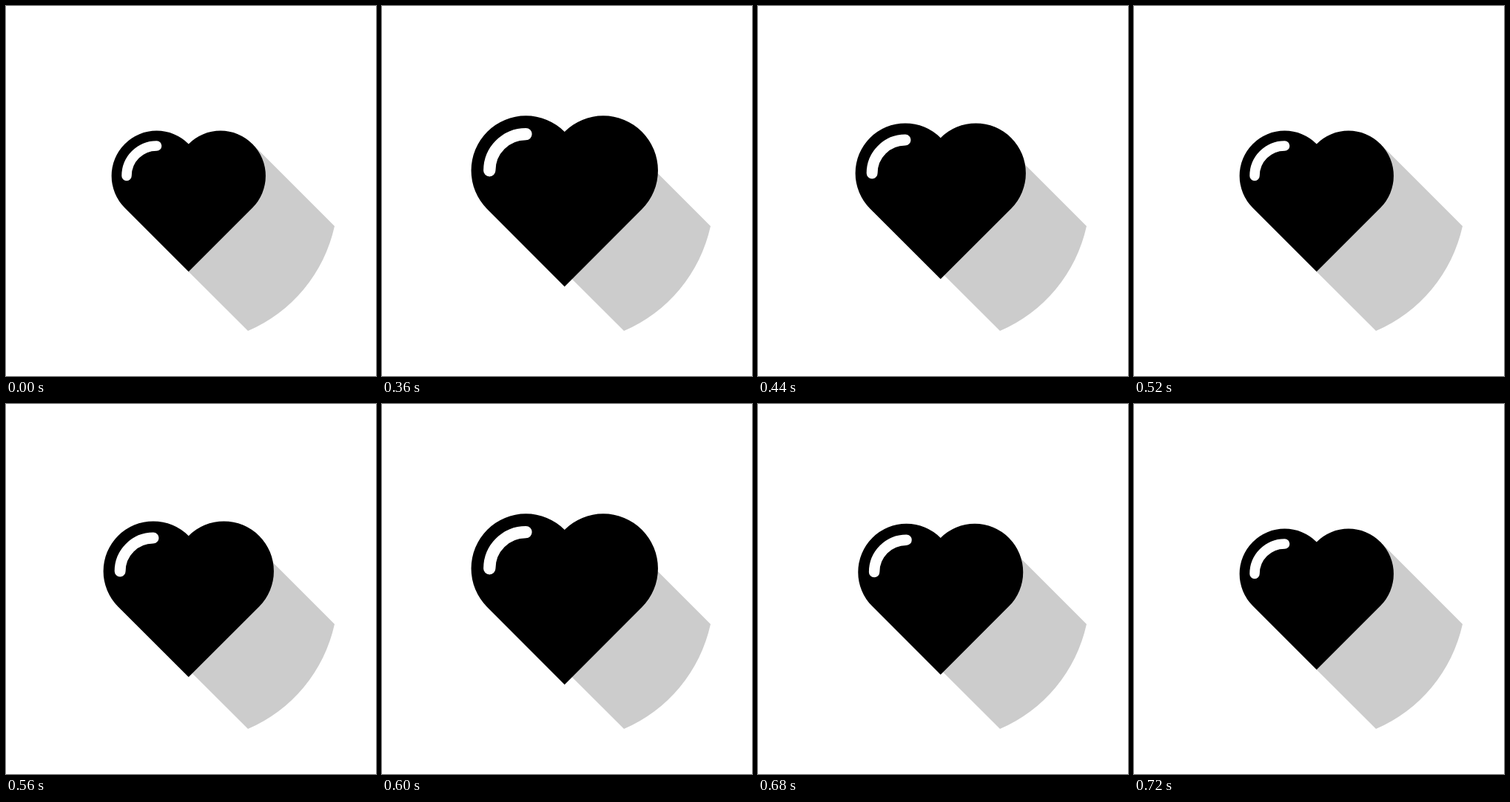
Write an HTML page with a canvas that moves like this. It is 500 px wide and 500 px high and loops after 2.4 s.

```html
<!DOCTYPE html>
<html lang="en">
<head>
<meta charset="utf-8">
<title>Heartbeat</title>
<style>
  html, body { margin: 0; width: 100%; height: 100%; overflow: hidden; background: #fff; }
  canvas { display: block; width: 500px; height: 500px; }
</style>
</head>
<body>
<canvas id="stage" width="500" height="500"></canvas>
<script>
const ctx = document.getElementById('stage').getContext('2d');
const LOOP = 2400, STEP = 40;
const CX = 246.75, CY = 263.75;   // beat centre
const R = 61, D = R / Math.SQRT2; // lobe radius and lobe offset
const LOBE_Y = -34.2;             // lobe centres, relative to the beat centre
const PEAK = 0.212;

// [time, growth]: two beats, the first starting abruptly
const BEATS = [[360, PEAK], [520, 0], [600, PEAK], [720, 0]];

function scaleAt(time) {
  const t = Math.floor(time / STEP) * STEP;
  for (let i = 1; i < BEATS.length; i++) {
    const [t0, a] = BEATS[i - 1], [t1, b] = BEATS[i];
    if (t >= t0 && t < t1) return 1 + a + (b - a) * (t - t0) / (t1 - t0);
  }
  return 1;
}

function drawShadow() {
  const x = 247.5, y = 254.2, r = 201.2;
  ctx.beginPath();
  ctx.moveTo(CX + 2 * D, CY + LOBE_Y - D);
  ctx.lineTo(444, 297.5);
  ctx.arc(x, y, r, Math.atan2(297.5 - y, 444 - x), Math.atan2(439 - y, 327 - x));
  ctx.lineTo(CX, CY + LOBE_Y + 3 * D);
  ctx.closePath();
  ctx.fillStyle = '#ccc';
  ctx.fill();
}

function drawHeart(scale) {
  ctx.save();
  ctx.translate(CX, CY);
  ctx.scale(scale, scale);

  ctx.beginPath();
  ctx.moveTo(0, LOBE_Y + 3 * D);
  ctx.arc(-D, LOBE_Y, R, Math.PI * 0.75, Math.PI * 1.75);
  ctx.arc(D, LOBE_Y, R, Math.PI * 1.25, Math.PI * 2.25);
  ctx.closePath();
  ctx.fillStyle = '#000';
  ctx.fill();

  // shine
  ctx.beginPath();
  ctx.arc(-D, LOBE_Y, 40.6, Math.PI, Math.PI * 1.5);
  ctx.lineWidth = 13.5;
  ctx.lineCap = 'round';
  ctx.strokeStyle = '#fff';
  ctx.stroke();
  ctx.restore();
}

function render(now) {
  ctx.fillStyle = '#fff';
  ctx.fillRect(0, 0, 500, 500);
  drawShadow();
  drawHeart(scaleAt(now % LOOP));
}

let start;
function frame(now) {
  if (start === undefined) start = now;
  render(now - start);
  requestAnimationFrame(frame);
}
render(0);
requestAnimationFrame(frame);
</script>
</body>
</html>
```
